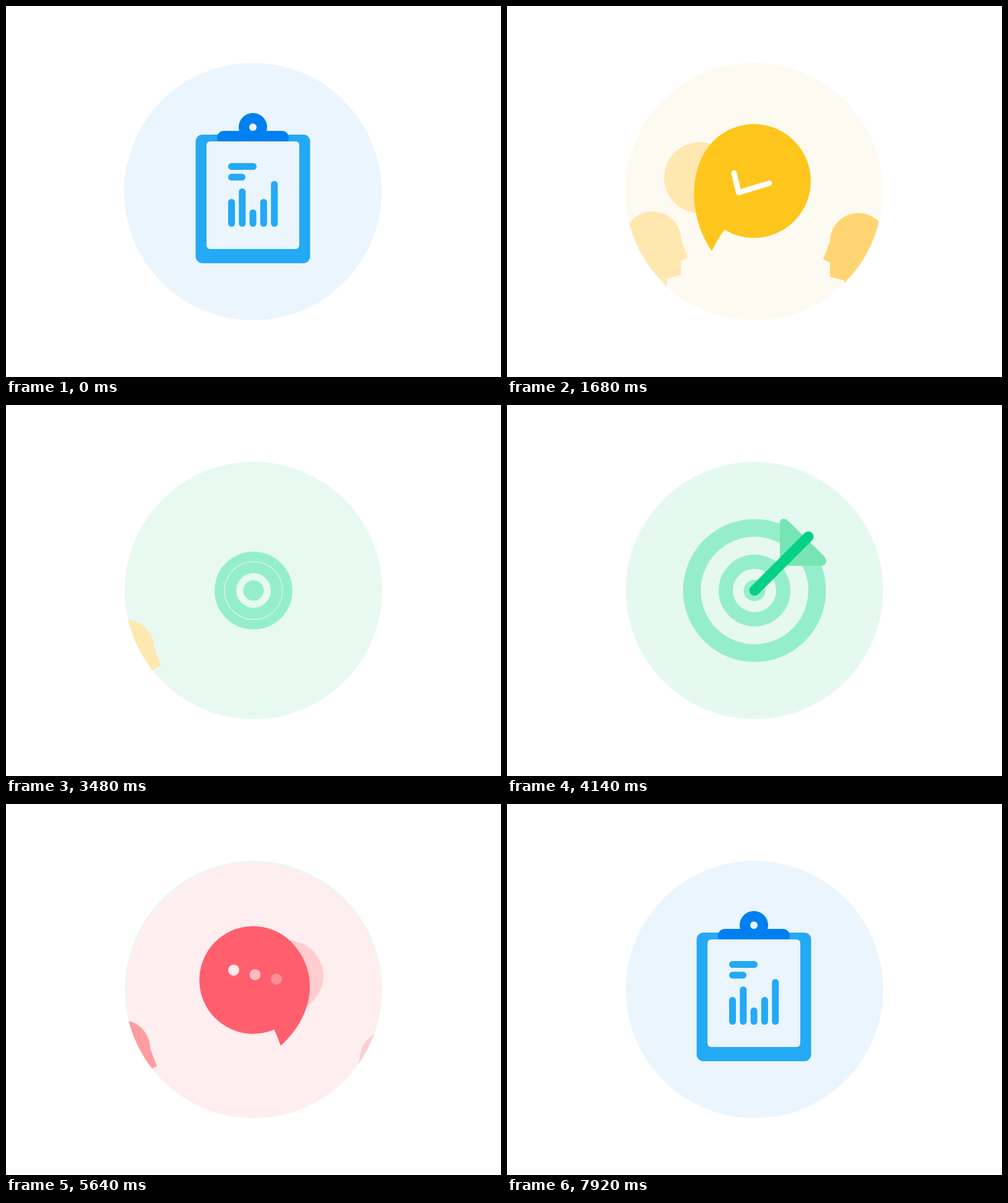
Animation, 800 px wide and 600 px high, one loop 8.1 s. Source, as an HTML page:

```html
<!DOCTYPE html>
<html lang="en">
<head>
<meta charset="utf-8">
<title>Feedback loop</title>
<style>
html, body { margin: 0; width: 100%; height: 100%; overflow: hidden; background: #fff; }
svg { display: block; width: 800px; height: 600px; }
</style>
</head>
<body>
<svg viewBox="0 0 800 600">
  <defs>
    <clipPath id="disc"><circle id="discEdge" cx="400" cy="300" r="208"/></clipPath>
    <clipPath id="floor"><rect width="800" height="456"/></clipPath>
    <path id="drop" d="M2 132Q0 112 1 92A92 92 0 1 0 -92 0C-92 57 -49 110 2 132Z"/>
    <path id="head" d="M267 490V438L290 432V409L301 404L290 375A46 46 0 0 0 198 375V490Z"/>
  </defs>
  <circle id="base" cx="400" cy="300" r="208"/>
  <circle id="pink" cx="400" cy="301.3" r="206.7" fill="#ffeeef"/>
  <g clip-path="url(#disc)"><g clip-path="url(#floor)">
    <use id="headL" href="#head"/>
    <use id="headR" href="#head"/>
  </g></g>
  <g id="rings" fill="none" stroke="#95eecb">
    <circle r="101.2" stroke-width="28.6"/>
    <circle r="46.5" stroke-width="23"/>
    <circle r="8.75" stroke-width="17.5"/>
  </g>
  <g id="dart">
    <path fill="#77e5b3" d="M441 260V191Q441 184 447 184Q451 184 455 188L511 243Q516 248 516 253Q515 260 508 260Z"/>
    <path d="M400 300L487 213" stroke="#04d185" stroke-width="17" stroke-linecap="round"/>
  </g>
  <g id="board">
    <rect id="back" fill="#24a9f5"/>
    <g id="clip" fill="#0080f0">
      <rect id="bar" y="202" height="22" rx="11"/>
      <circle cx="399" cy="196" r="23"/>
      <circle cx="399" cy="196" r="6" fill="#ebf5fe"/>
    </g>
    <rect id="paper" fill="#eaf5fe"/>
    <g id="chart" fill="#24a9f5"></g>
  </g>
  <use id="echo" href="#drop"/>
  <g id="yellow">
    <use href="#drop" fill="#fec61c"/>
    <path id="check" d="M-34 6L-11 29L35 -24" pathLength="100" fill="none" stroke="#fff"
      stroke-width="9" stroke-linecap="round" stroke-linejoin="round"/>
  </g>
  <g id="red">
    <path id="talk" fill="#ff5f6d" d="M-37 109Q-32 98 -27.5 82.5A87 87 0 1 1 87 0C87 67 30 109 -37 109Z"/>
    <g id="dots" fill="#ffecee"></g>
  </g>
</svg>
<script>
const LOOP = 8100;
const $ = id => document.getElementById(id);
const set = (el, attrs) => { for (const k in attrs) el.setAttribute(k, attrs[k]); };
const add = (parent, tag, attrs) => {
  const el = document.createElementNS('http://www.w3.org/2000/svg', tag);
  set(el, attrs);
  return parent.appendChild(el);
};
const show = (el, on) => { el.style.display = on ? '' : 'none'; };
const span = (t, a, b) => Math.min(1, Math.max(0, (t - a) / (b - a)));
const smooth = u => u * u * (3 - 2 * u);
const ease = (t, a, b) => smooth(span(t, a, b));
const left = (t, a, b, p) => (1 - span(t, a, b)) ** p;
const mix = (a, b, u) => a + (b - a) * u;
const blend = (a, b, u) => `rgb(${a.map((v, i) => Math.round(mix(v, b[i], u)))})`;
const place = (el, x, y, turn, sx, sy = sx) =>
  set(el, { transform: `translate(${x} ${y}) rotate(${turn}) scale(${sx} ${sy})` });

const BLUE = [235, 245, 254], CREAM = [255, 251, 240], MINT = [230, 249, 241];
const chart = $('chart');
const lines = [46, 28].map((w, i) => add(chart, 'rect', { x: 359, y: 254 + i * 17.3, height: 11, rx: 5.5 }));
const bars = [312, 295, 329, 312, 283].map((top, i) => ({
  top, el: add(chart, 'rect', { x: 359 + i * 17.3, width: 11, rx: 5.5 })
}));
const dots = [267, 272.5, 278].map((y, i) => ({
  y: y - 283, el: add($('dots'), 'circle', { cx: -31.5 + i * 34.5, r: 9 })
}));

// k runs from 750 (open) to 1450 (folded)
const fold = k => span(k, 750, 1450) ** 3;

function drawBoard(k) {
  const u = span(k, 750, 1450), q = u ** 3, h = smooth(u);
  show($('board'), u < 1);
  if (u >= 1) return;
  const box = (id, w, height, y, rx) =>
    set($(id), { x: 399 - w / 2, y, width: w, height: Math.max(0, height), rx });
  box('back', 185 - 160 * q, 208 * (1 - .74 * h), 208 + 100 * q, 11 - 6 * q);
  box('paper', 150 - 128 * q, 174 * (1 - h), 219 + 101 * q, 6 - 5 * q);
  const bar = 116 - 45 * q;
  set($('bar'), { x: 399 - bar / 2, width: bar });
  const shift = `translate(0 ${85 * q})`;
  set($('clip'), { transform: shift });
  set(chart, { transform: shift });
  set(lines[0], { width: 46 * (1 - ease(k, 1000, 1400)) });
  set(lines[1], { width: 28 * (1 - ease(k, 850, 1150)) });
  bars.forEach(({ top, el }, i) => {
    const len = (357 - top) * (1 - ease(k, 760 + i * 35, 1020 + i * 35));
    set(el, { y: 357 - len, height: len });
  });
}

function drawBackground(t) {
  const cx = t < 2835 ? 399 : 400;
  const fill = t < 2820 ? blend(BLUE, CREAM, ease(t, 750, 1920))
    : t < 6000 ? blend(CREAM, MINT, ease(t, 2850, 3550))
    : blend(MINT, BLUE, ease(t, 7000, 7850));
  set($('base'), { cx, fill });
  set($('discEdge'), { cx });
  set($('pink'), { opacity: ease(t, 4980, 5600) * (1 - ease(t, 7000, 7850)) });
}

function drawHeads(t) {
  const warm = t < 4500, enter = warm ? 1350 : 5520, exit = warm ? 2820 : 6690;
  const on = t > enter && t < exit + 880;
  show($('headL'), on);
  show($('headR'), on);
  if (!on) return;
  const come = left(t, enter, enter + 570, 3);
  const slow = span(t, exit, exit + 870) ** 3, fast = span(t, exit, exit + 750) ** 4;
  const l = come + (warm ? slow : fast), r = come + (warm ? fast : slow);
  set($('headL'), { fill: warm ? '#ffe7b0' : '#ff9ca1', transform: `translate(${-116 * l} ${41 * l})` });
  set($('headR'), { fill: warm ? '#ffd573' : '#ffcdce', transform: `translate(${803 + 119 * r} ${77 * r}) scale(-1 1)` });
}

function drawEcho(t, grow) {
  const warm = t < 4500, enter = warm ? 1310 : 5480, exit = warm ? 2820 : 6690;
  const come = left(t, enter, enter + 680, 3);
  const u = span(t, exit, exit + 750);
  const away = come + 1.7 * u ** 3 - .7 * u * u;
  const size = .625 * grow * (1 - ease(u, .5, 1));
  show($('echo'), t > enter && size > .001);
  set($('echo'), { fill: warm ? '#ffe7b0' : '#ffcdce' });
  place($('echo'), mix(warm ? 302 : 500, 400, away), (warm ? 277 : 275) + 7 * come, 0, warm ? -size : size, size);
}

function drawYellow(t) {
  const out = ease(t, 2880, 3420);
  const size = ease(t, 1080, 1580) * (1 - out);
  show($('yellow'), t < 4000 && size > .001);
  place($('yellow'), 399 + out, 196 + 87 * fold(t) + 17 * out, 180 * (1 - ease(t, 1080, 1900)) - 150 * out, size);
  set($('check'), { 'stroke-dasharray': `${.01 + 100 * ease(t, 1220, 1850)} 200` });
  return size;
}

function drawRed(t, back) {
  const size = ease(t, 5230, 5600) * ease(back, 1080, 1580);
  show($('red'), size > .001);
  const y = t < 6690 ? 283 + 17 * left(t, 5230, 5990, 3) : 196 + 87 * fold(back);
  place($('red'), 399.5, y, 0, size);
  const turn = -195 * left(t, 5230, 5990, 2) + 150 * ease(t, 6960, 7600);
  set($('talk'), { transform: `rotate(${turn})` });
  dots.forEach((d, i) => {
    const a = span(t, 5340 + i * 100, 5640 + i * 100);
    set(d.el, { cy: d.y + 5.3 * (1 - a), opacity: a });
  });
  return size;
}

function drawTarget(t) {
  [...$('rings').children].forEach((ring, i) => {
    const s = ease(t, 3300 - i * 90, 3640 - i * 50) * (1 - ease(t, 5060 + i * 50, 5380 + i * 50));
    show(ring, s > .001);
    place(ring, 400, 300, 0, s);
  });
  const come = left(t, 3690, 4080, 3), go = span(t, 4980, 5300) ** 2;
  const d = 46 * come + 54 * go;
  const a = span(t, 3690, 3840) * (1 - span(t, 5130, 5300));
  show($('dart'), a > 0);
  set($('dart'), { opacity: a, transform: `translate(${d} ${-d})` });
}

function draw(t) {
  const back = 750 + 7920 - t;
  drawBackground(t);
  drawBoard(t < 4500 ? t : back);
  drawTarget(t);
  drawHeads(t);
  const y = drawYellow(t), r = drawRed(t, back);
  drawEcho(t, t < 4500 ? y : r);
}

const start = performance.now();
function tick() {
  const t = (performance.now() - start) % LOOP;
  draw(Math.floor(t / 30) * 30);
  requestAnimationFrame(tick);
}
tick();
</script>
</body>
</html>
```
